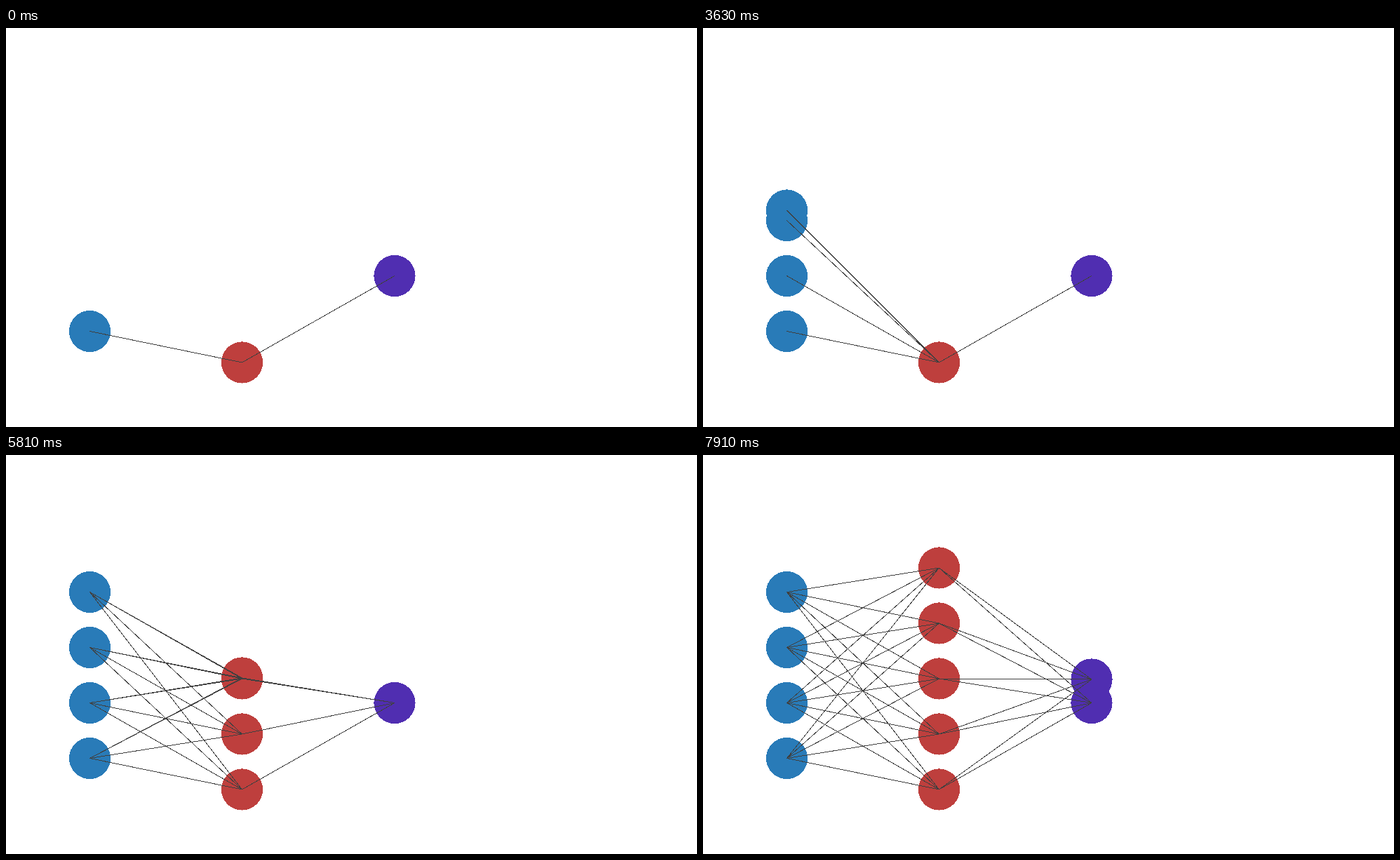
Recreate the animation shown at these times as an HTML page. Size 985x569 px, loop 7.99 s.

```html
<!DOCTYPE html>
<html lang="en">
<head>
<meta charset="utf-8">
<title>Growing network</title>
<style>
  html, body { margin: 0; width: 100%; height: 100%; overflow: hidden; background: #fff; }
  svg { display: block; width: 985px; height: 569px; }
</style>
</head>
<body>
<svg id="stage" viewBox="0 0 985 569" xmlns="http://www.w3.org/2000/svg">
  <g id="nodes" shape-rendering="crispEdges"></g>
  <g id="links" shape-rendering="crispEdges" stroke="#404040" stroke-width="1"></g>
  <g id="ring" fill="none" stroke="#000">
    <circle cx="809" cy="432" r="11" stroke-width="1"/>
  </g>
  <path id="cursor" d="M.5 .5V16.5L4.2 13 6.5 18.5 9 17.5 6.7 12.2H11.3Z"
        fill="#fff" stroke="#000" stroke-width="1"/>
</svg>
<script>
const LOOP = 7990;
const GAP = 79;
const TICK = 78;
const RADIUS = 29.6;

// Times the picture is held to; the spans between are split into even ticks.
const knots = [0, 260, 660, 1040, 1120, 1980, 2700, 2790, 3550, 3630, 3940, 4260, 4410,
  5020, 5090, 5180, 5880, 5960, 6420, 6750, 6840, 7450, 7830, 7910, LOOP];

const layers = [
  { x: 119.5, base: 432.5, count: 4, color: '#297bb8', start: 1955, speed: 0.2445 },
  { x: 336.5, base: 477, count: 5, color: '#be3f3d', start: 4228, speed: 0.2516 },
  { x: 554, base: 353.5, count: 2, color: '#502eb1', start: 7776, speed: 0.25 }
];

const $ = id => document.getElementById(id);
const clamp = (v, lo, hi) => Math.min(hi, Math.max(lo, v));
const mix = (a, b, k) => a + (b - a) * k;

function add(parent, tag, attrs) {
  const el = document.createElementNS('http://www.w3.org/2000/svg', tag);
  for (const key in attrs) el.setAttribute(key, attrs[key]);
  return parent.appendChild(el);
}

for (const layer of layers) {
  layer.nodes = Array.from({ length: layer.count }, () => ({
    y: layer.base,
    el: add($('nodes'), 'circle', { cx: layer.x, r: RADIUS, fill: layer.color })
  }));
}

const links = [];
for (let i = 0; i + 1 < layers.length; i++) {
  const [left, right] = [layers[i], layers[i + 1]];
  for (const a of left.nodes) {
    for (const b of right.nodes) {
      links.push({ a, b, el: add($('links'), 'line', { x1: left.x, x2: right.x }) });
    }
  }
}

function hold(t) {
  let i = 0;
  while (i < knots.length - 2 && t >= knots[i + 1]) i++;
  const from = knots[i], span = knots[i + 1] - from;
  const step = span / Math.max(1, Math.round(span / TICK));
  return from + Math.floor((t - from) / step + 0.001) * step;
}

// Each node climbs from the base to its slot once the one before it has arrived.
function moveNodes(layer, t) {
  const travelled = layer.speed * (t - layer.start);
  layer.nodes.forEach((node, k) => {
    const before = GAP * k * (k - 1) / 2;
    node.y = layer.base - clamp(travelled - before, 0, GAP * k);
    node.el.setAttribute('cy', node.y.toFixed(2));
  });
}

function moveCursor(t) {
  const come = clamp((t - 260) / 400, 0, 1);
  const go = clamp((t - 2060) / 480, 0, 1);
  const enter = (1 - come) ** 2;
  const x = mix(809, 875, enter) + 112 * go * go;
  const y = mix(432, 556, enter) + 140 * go * go;
  $('cursor').setAttribute('transform', `translate(${Math.round(x)} ${Math.round(y)})`);
  $('cursor').style.display = t >= 260 && go < 1 ? '' : 'none';
  $('ring').style.display = t >= 1040 && t < 1120 ? '' : 'none';
}

function draw(time) {
  const t = hold(time % LOOP);
  layers.forEach(layer => moveNodes(layer, t));
  for (const { a, b, el } of links) {
    el.setAttribute('y1', a.y.toFixed(2));
    el.setAttribute('y2', b.y.toFixed(2));
  }
  moveCursor(t);
}

const begin = performance.now();
function frame() {
  draw(performance.now() - begin);
  requestAnimationFrame(frame);
}
draw(0);
requestAnimationFrame(frame);
</script>
</body>
</html>
```
